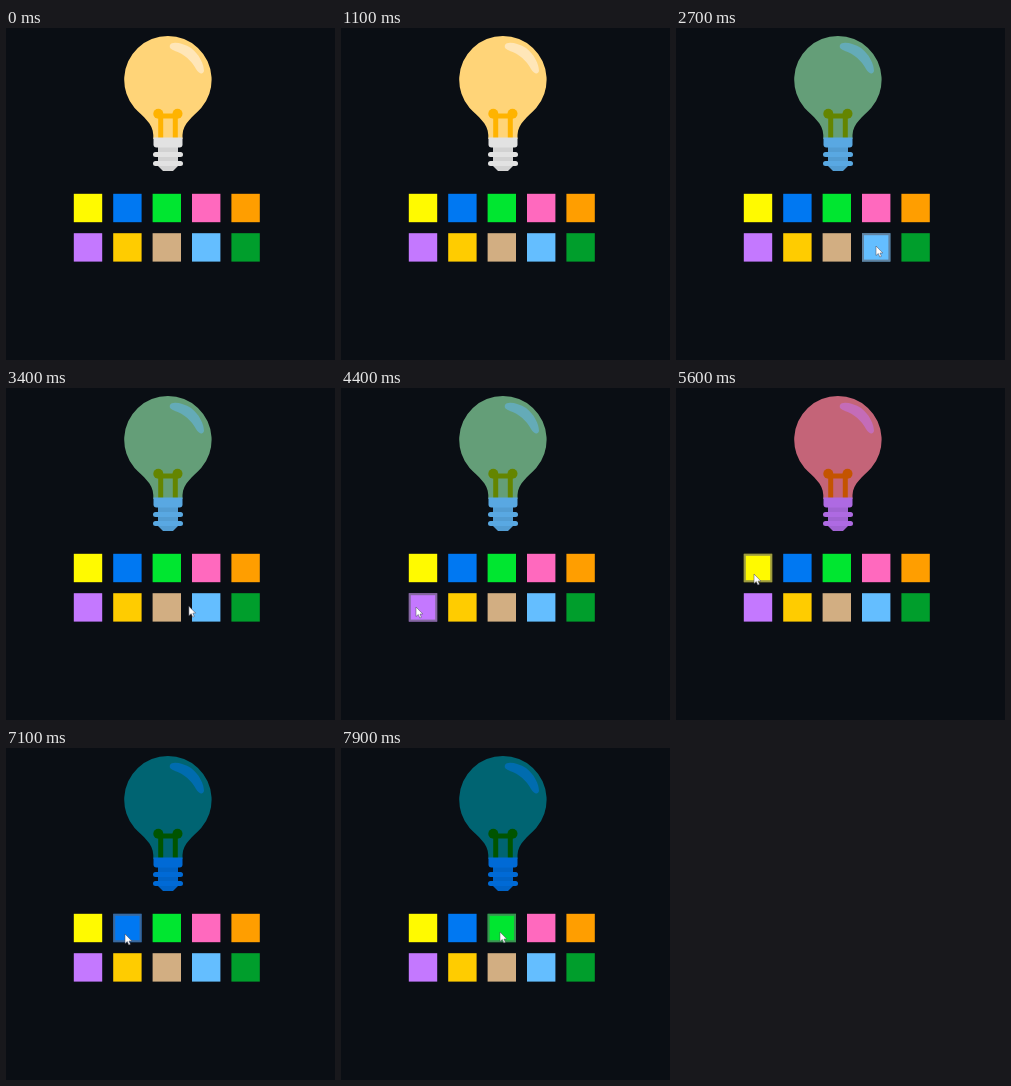
These frames come from a looping animation (329 by 332 pixels, 8000 ms). An HTML page:

```html
<!DOCTYPE html>
<html lang="en">
<head>
<meta charset="utf-8">
<title>Light bulb colours</title>
<style>
  html, body { margin: 0; width: 100%; height: 100%; overflow: hidden; background: #0a0e14; }
  svg { display: block; width: 329px; height: 332px; }
</style>
</head>
<body>
<svg viewBox="0 0 329 332">
  <filter id="multiply" color-interpolation-filters="sRGB">
    <feFlood id="tint" result="tint"/>
    <feComposite in="SourceGraphic" in2="tint" operator="arithmetic" k1="1"/>
  </filter>
  <g filter="url(#multiply)">
    <path fill="#ffd478" d="M147.300 111V107C147 95 137 89 128.600 80A43.700 43.700 0 1 1 195.200 80C187 89 177 95 176.500 107V111Z"/>
    <path fill="#ffe6b8" d="M164 17C166 13 177 15 185 20C193 26 198 36 198 43C197 47 193 46 190 41C185 32 178 26 169 23C165 21 163 20 164 17Z"/>
    <g fill="#ffb300">
      <circle cx="152.300" cy="85.700" r="5"/>
      <circle cx="171.500" cy="85.700" r="5"/>
      <path d="M154.700 110V88H169.300V110" fill="none" stroke="#ffb300" stroke-width="5"/>
    </g>
    <path fill="#d2d2d2" d="M152 117h20v21l-5 5h-10l-5-5Z"/>
    <g fill="#e2e2e2">
      <path d="M147.500 109.500h29v7q0 3-3 3h-23q-3 0-3-3Z"/>
      <rect x="147" y="124" width="30" height="5" rx="2.500"/>
      <rect x="147" y="133" width="30" height="5" rx="2.500"/>
    </g>
  </g>
  <g id="swatches"></g>
  <rect id="hover" x="1" y="1" width="26.400" height="26.400" fill="none" stroke="#606068" stroke-opacity=".62" stroke-width="2"/>
  <path id="cursor" d="M0 0V9.500L2.300 7.500L3.800 11L5.400 10.300L4 7H6.800Z" fill="#fff" stroke="#445" stroke-width=".5"/>
</svg>
<script>
const DURATION = 8000, SIZE = 28.4, PITCH = 39.4, COLUMNS = 5;
const COLORS = ['#fffa00', '#0078f2', '#00e630', '#ff69be', '#ff9e00',
                '#c478ff', '#ffcc00', '#d2ae82', '#64beff', '#009e2c'];

// The pointer travels to each stop and may click there.
const START = { x: 214, y: 345 };
const STOPS = [
  { leave: 1550, arrive: 1850, x: 200, y: 218, click: 2300 },
  { leave: 3250, arrive: 3900, x: 75, y: 219, click: 4600 },
  { leave: 5000, arrive: 5400, x: 78, y: 186, click: 5900 },
  { leave: 6500, arrive: 6800, x: 119, y: 186, click: 7100 },
  { leave: 7400, arrive: 7900, x: 159, y: 184 }
];

const $ = id => document.getElementById(id);
const clamp = v => Math.min(1, Math.max(0, v));
const ease = k => k * k * (3 - 2 * k);

const swatches = COLORS.map((fill, i) => {
  const x = 67.8 + (i % COLUMNS) * PITCH;
  const y = 165.8 + Math.floor(i / COLUMNS) * PITCH;
  const el = document.createElementNS('http://www.w3.org/2000/svg', 'rect');
  for (const [name, value] of Object.entries({ x, y, width: SIZE, height: SIZE, fill })) {
    el.setAttribute(name, value);
  }
  $('swatches').append(el);
  return { x, y, fill };
});

const swatchAt = ({ x, y }) => swatches.find(s =>
  x >= s.x && x < s.x + SIZE && y >= s.y && y < s.y + SIZE);

function pointerAt(t) {
  return STOPS.reduce((pos, stop) => {
    const k = ease(clamp((t - stop.leave) / (stop.arrive - stop.leave)));
    return { x: pos.x + (stop.x - pos.x) * k, y: pos.y + (stop.y - pos.y) * k };
  }, START);
}

function place(el, pos) {
  el.setAttribute('visibility', pos ? 'visible' : 'hidden');
  if (pos) el.setAttribute('transform', `translate(${pos.x} ${pos.y})`);
}

function draw(t) {
  const clicked = STOPS.filter(stop => stop.click <= t).pop();
  $('tint').setAttribute('flood-color', clicked ? swatchAt(clicked).fill : '#fff');

  const tip = pointerAt(t);
  place($('cursor'), tip);
  place($('hover'), swatchAt(tip));
}

function frame() {
  draw(performance.now() % DURATION);
  requestAnimationFrame(frame);
}
frame();
</script>
</body>
</html>
```
